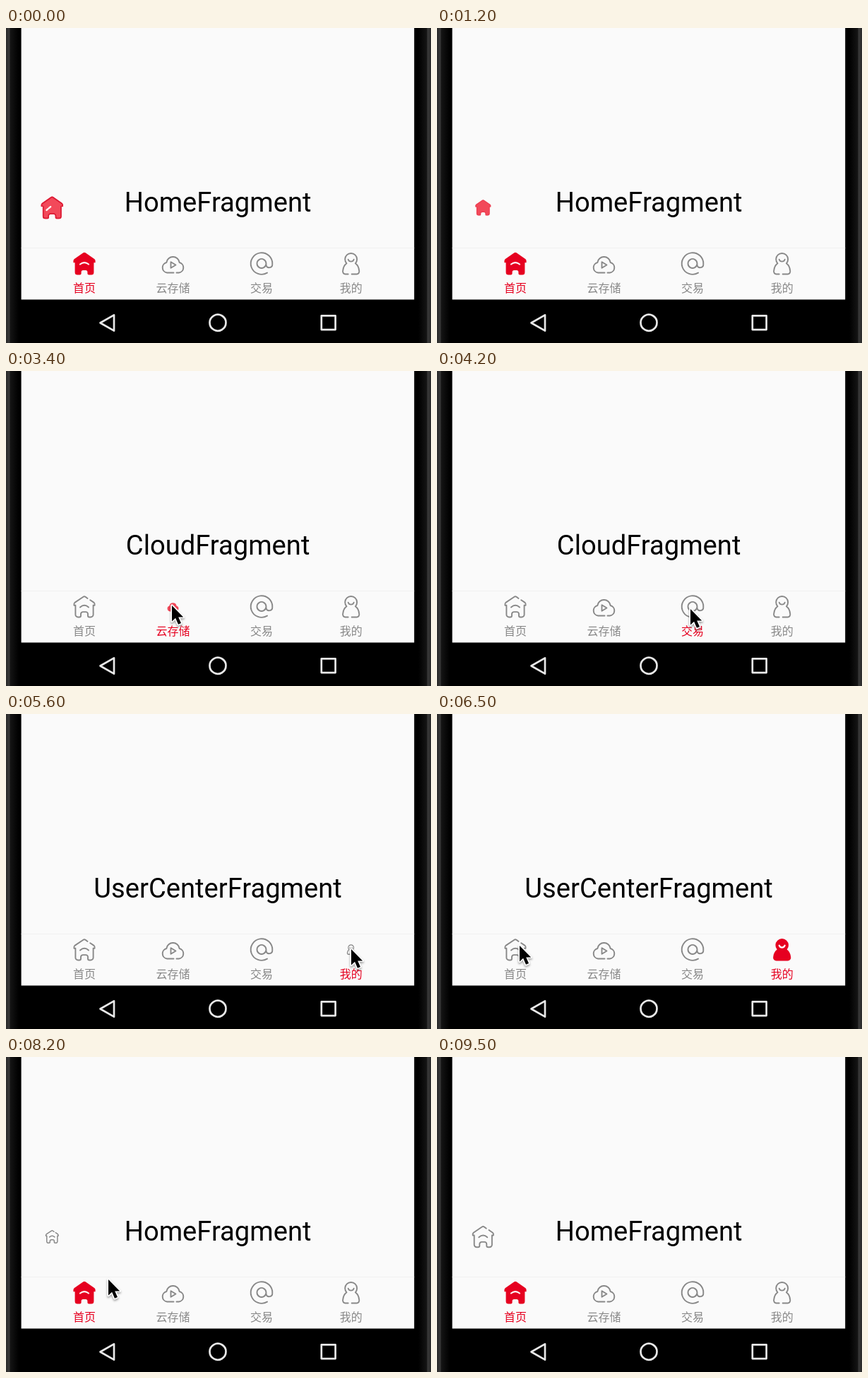
Animation of 602 by 446 pixels, one loop 9600 ms. Source, as an HTML page with a canvas:

```html
<!DOCTYPE html>
<html lang="zh-CN">
<head>
<meta charset="utf-8">
<title>Tab bar animation</title>
<style>
html, body { margin: 0; width: 100%; height: 100%; overflow: hidden; background: #000; }
canvas { display: block; }
</style>
</head>
<body>
<canvas id="stage" width="602" height="446"></canvas>
<script>
const ctx = document.getElementById('stage').getContext('2d');
const LOOP = 9600, STEP = 100, CYCLE = 1600;
const GREY = '#888', RED = '#e60020', PAPER = '#fafafa';

const icons = {
  home: {
    min: 0.6,
    line: new Path2D('M4.5 -11.6L1.5 -13.8Q0 -14.8 -1.5 -13.8L-13.6 -5.6Q-15.2 -4.2 -14.6 -1.8H-12.6V11.4A3.6 3.6 0 0 0 -9 15H-7Q-5 15 -5 13V10.6A3 3 0 0 1 -2 7.6H2A3 3 0 0 1 5 10.6V13Q5 15 7 15H9A3.6 3.6 0 0 0 12.6 11.4V-1.8H14.6Q15.2 -4.2 13.6 -5.6L8.2 -9.3M-6 1Q0 -4.4 6 1'),
    fill: new Path2D('M-1.6 -15.2Q0 -16.2 1.6 -15.2L14.5 -6.3Q16.4 -4.6 15.6 -1.2H13.4V12.5A3.5 3.5 0 0 1 9.9 16H6.3Q4.4 16 4.4 14V12A2.6 2.6 0 0 0 1.8 9.4H-1.8A2.6 2.6 0 0 0 -4.4 12V14Q-4.4 16 -6.3 16H-9.9A3.5 3.5 0 0 1 -13.4 12.5V-1.2H-15.6Q-16.4 -4.6 -14.5 -6.3Z'),
    detail: new Path2D('M-6 1Q0 -3.6 6 1')
  },
  cloud: {
    min: 0.5,
    line: new Path2D('M1 13H-8.4A7.4 7.4 0 0 1 -9.2 -1.5A9.3 9.3 0 0 1 9.2 -1.5A7.4 7.4 0 0 1 8.4 13H5M-3 -2.3V6.3L4 2Z'),
    fill: new Path2D('M-8.4 14A8.2 8.2 0 0 1 -10.1 -2A10.3 10.3 0 0 1 10.1 -2A8.2 8.2 0 0 1 8.4 14Z'),
    detail: new Path2D('M-3 -2.3V6.3L4 2Z')
  },
  trade: {
    min: 0.5,
    line: new Path2D('M6.5 0A6.5 6.5 0 1 1 6.5 -0.1V2.5A4.5 4.5 0 0 0 15.3 1A15.3 15.3 0 1 0 8 13.1'),
    fill: new Path2D('M16 0A16 16 0 1 1 16 -0.1Z'),
    detail: new Path2D('M6.5 0A6.5 6.5 0 1 1 6.5 -0.1V2.5A4.5 4.5 0 0 0 15 2')
  },
  user: {
    min: 0.45,
    line: new Path2D('M-4 15H-8A3.8 3.8 0 0 1 -11.5 10C-11 5 -9 1.8 -6.2 -0.2A8.5 8.5 0 1 1 6.2 -0.2C9 1.8 11 5 11.5 10A3.8 3.8 0 0 1 8 15H1M-4 -5.8A4.2 4.2 0 0 0 4 -5.8'),
    fill: new Path2D('M-8 16A4.5 4.5 0 0 1 -12.5 10.5C-12 5.5 -10 2 -7 0A9.3 9.3 0 1 1 7 0C10 2 12 5.5 12.5 10.5A4.5 4.5 0 0 1 8 16Z'),
    detail: new Path2D('M-4 -5.8A4.2 4.2 0 0 0 4 -5.8')
  }
};

const tabs = [
  { icon: icons.home, x: 111, label: '首页', page: 'HomeFragment' },
  { icon: icons.cloud, x: 236.5, label: '云存储', page: 'CloudFragment' },
  { icon: icons.trade, x: 362, label: '交易', page: 'ExchangeFragment' },
  { icon: icons.user, x: 488.7, label: '我的', page: 'UserCenterFragment' }
];
// A press turns the label red; the page follows one step later
const presses = [
  { tab: 0, at: -CYCLE }, { tab: 1, at: 2800 }, { tab: 2, at: 4200 },
  { tab: 3, at: 5300 }, { tab: 0, at: 7100 }
];
const HIDE_HOME = 2900, SHOW_HOME = 7200;

// time, x, y
const cursorPath = [
  [1300, 291, 205], [1500, 290, 210], [2200, 235, 332], [3500, 235, 332],
  [4000, 359, 337], [4600, 359, 337], [5100, 489, 333], [5800, 489, 333],
  [6400, 117, 328], [8000, 117, 328], [8200, 145, 315], [8500, 236, 265], [8900, 236, 265]
];
const arrow = new Path2D('M0 0V22.5L5.1 17.8L9 26.7L13 25L9.2 16.4H16.2Z');
const glints = new Path2D('M-2.8 2.6L-0.8 0.8M0.8 -0.6L2.8 -2.2');

const clamp = v => Math.min(1, Math.max(0, v));
const ease = v => v * v * (3 - 2 * v);
const ramp = (t, a, b) => ease(clamp((t - a) / (b - a)));
const lastPress = t => presses.filter(p => p.at <= t).pop();

function strokePath(path, color, width) {
  ctx.strokeStyle = color;
  ctx.lineWidth = width;
  ctx.stroke(path);
}

function drawLine(icon, scale = 1) {
  strokePath(icon.line, GREY, 1.9 / Math.sqrt(scale));
}

function drawFilled(icon) {
  ctx.fillStyle = RED;
  ctx.fill(icon.fill);
  strokePath(icon.detail, '#fff', 2.2);
}

function drawMorph(icon, phase) {
  const shrink = ramp(phase, 0, 300) - ramp(phase, 700, 1000);
  const red = ramp(phase, 400, 600);
  const scale = 1 - (1 - icon.min) * shrink;
  ctx.scale(scale, scale);
  if (red < 1) {
    ctx.globalAlpha = 1 - red;
    drawLine(icon, scale);
  }
  if (red > 0) {
    ctx.globalAlpha = red;
    ctx.fillStyle = '#f2495a';
    ctx.fill(icon.fill);
    ctx.clip(icon.fill);
    ctx.globalAlpha = ramp(phase, 700, 1000);
    strokePath(icon.fill, '#dc1c35', 3.4);
    if (phase >= 1000 && phase < 1500) {
      ctx.translate(-5 + (phase - 1200) / 25, 1);
      strokePath(glints, '#fff', 2.4);
    }
  }
}

function at(x, y, draw) {
  ctx.save();
  ctx.translate(x, y);
  ctx.lineCap = ctx.lineJoin = 'round';
  draw();
  ctx.restore();
}

function drawText(text, x, y, font, color) {
  ctx.font = font;
  ctx.fillStyle = color;
  ctx.textAlign = 'center';
  ctx.fillText(text, x, y);
}

function drawBezel(outer, inner) {
  const shade = ctx.createLinearGradient(outer, 0, inner, 0);
  shade.addColorStop(0, '#2a2a2a');
  shade.addColorStop(0.25, '#383838');
  shade.addColorStop(0.35, '#141414');
  shade.addColorStop(1, '#000');
  ctx.fillStyle = shade;
  ctx.fillRect(Math.min(outer, inner), 0, Math.abs(inner - outer), 446);
}

function drawPhone() {
  ctx.fillStyle = '#000';
  ctx.fillRect(0, 0, 602, 446);
  drawBezel(0, 18);
  drawBezel(602, 584);
  ctx.fillStyle = PAPER;
  ctx.fillRect(21.6, 0, 556.6, 384.5);
  ctx.fillStyle = '#f0f0f0';
  ctx.fillRect(21.6, 311, 556.6, 1);

  at(0, 0, () => {
    const keys = ['M133.5 417.5L153 406.3V428.7Z', 'M311.5 417.3A11.5 11.5 0 1 1 311.5 417.2Z',
      'M446.8 407.3H466.6V427.1H446.8Z'];
    for (const key of keys) strokePath(new Path2D(key), '#e8e8e8', 2.7);
  });
}

function drawTabs(t) {
  const active = lastPress(t);
  tabs.forEach((tab, i) => {
    const selected = active.tab === i;
    const phase = t - active.at;
    at(tab.x, 333.5, () => {
      if (!selected) drawLine(tab.icon);
      else if (phase < 1000) drawMorph(tab.icon, phase);
      else drawFilled(tab.icon);
    });
    drawText(tab.label, tab.x, 374, '16px "Noto Sans CJK SC", "Noto Sans CJK", sans-serif',
      selected ? RED : GREY);
  });
}

function drawPage(t) {
  const tab = tabs[lastPress(t - STEP).tab];
  drawText(tab.page, 300.1, 260, '38.15px Roboto, sans-serif', '#000');
  if (t >= HIDE_HOME && t < SHOW_HOME) return;
  const paused = t >= SHOW_HOME ? SHOW_HOME - HIDE_HOME : 0;
  const phase = (t - paused + 1200) % CYCLE;
  at(65.3, 254.3, () => drawMorph(icons.home, phase));
}

function drawCursor(t) {
  const next = cursorPath.findIndex(p => p[0] > t);
  if (next < 1) return;
  const [t0, x0, y0] = cursorPath[next - 1], [t1, x1, y1] = cursorPath[next];
  const k = ramp(t, t0, t1);
  at(x0 + (x1 - x0) * k, y0 + (y1 - y0) * k, () => {
    ctx.shadowColor = 'rgba(0,0,0,.35)';
    ctx.shadowBlur = 3;
    ctx.shadowOffsetY = 2;
    strokePath(arrow, '#fff', 3.4);
    ctx.shadowColor = 'transparent';
    ctx.fillStyle = '#000';
    ctx.fill(arrow);
  });
}

const start = performance.now();
function frame() {
  const elapsed = Math.max(0, performance.now() - start) % LOOP;
  const t = Math.floor(elapsed / STEP) * STEP;
  drawPhone();
  drawPage(t);
  drawTabs(t);
  drawCursor(t);
  requestAnimationFrame(frame);
}
frame();
</script>
</body>
</html>
```
